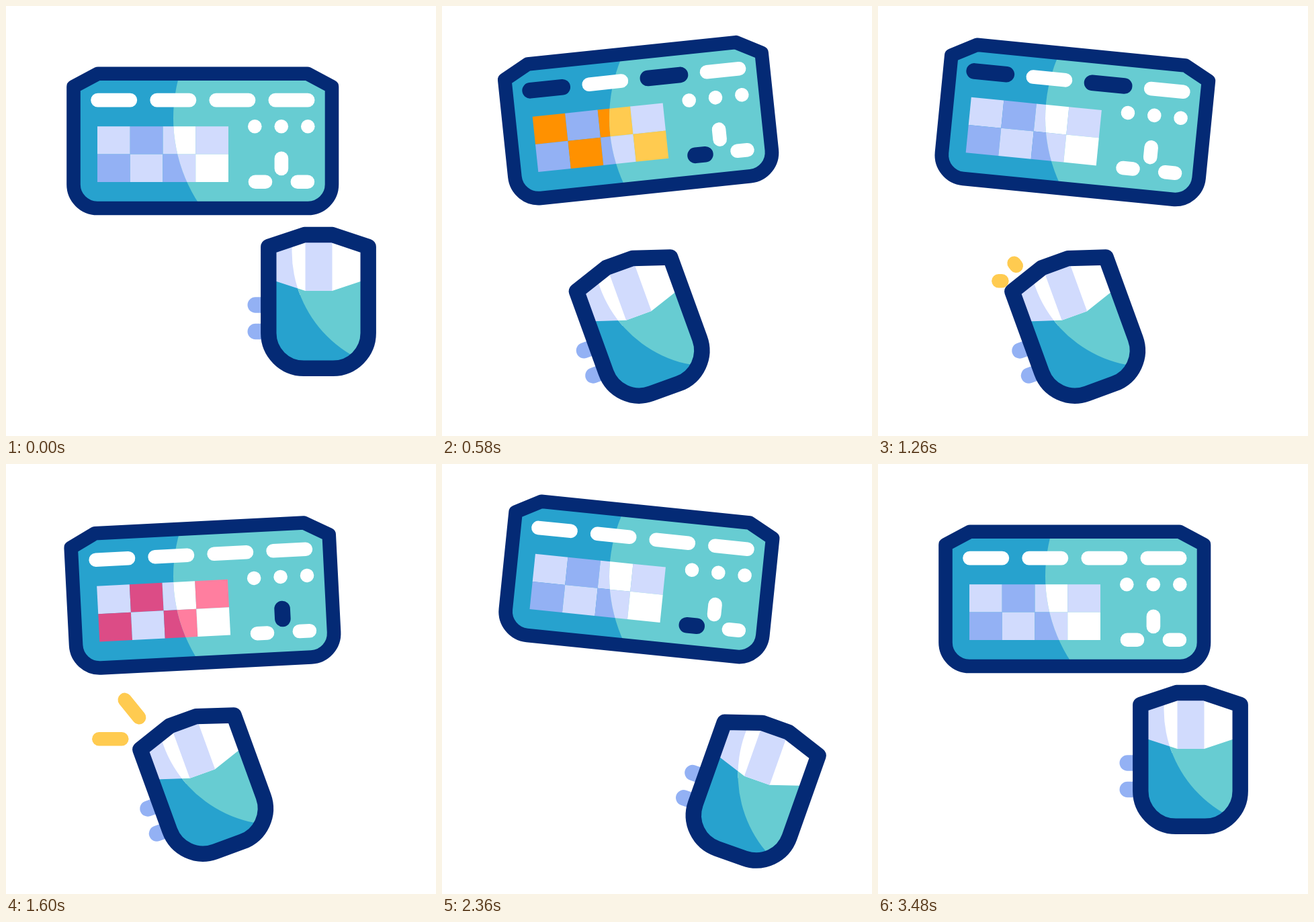
An HTML page with a canvas for the animation above (3600 ms loop, 640 by 640 pixels).

```html
<!DOCTYPE html>
<html lang="en">
<head>
<meta charset="utf-8">
<title>Keyboard and mouse</title>
<style>
  html, body { margin: 0; width: 100%; height: 100%; overflow: hidden; background: #fff; }
  canvas { display: block; width: 640px; height: 640px; }
</style>
</head>
<body>
<canvas id="stage" width="640" height="640"></canvas>
<script>
const ctx = document.getElementById('stage').getContext('2d');
const LOOP = 3600, END = 3480, BEAT = 600, HOP = 900;
const NAVY = '#042a75', WHITE = '#fff', LAVENDER = '#d1dbfd', PERIWINKLE = '#93b1f4';
const BLUE = '#27a2ce', TEAL = '#67ccd2', YELLOW = '#ffcb50';

// Each theme: board colour, then idle and lit colours of the two checker groups.
const DARK = { base: BLUE, idle: [LAVENDER, PERIWINKLE], lit: ['#ff9100', '#dc4c86'] };
const LIGHT = { base: TEAL, idle: [WHITE, LAVENDER], lit: [YELLOW, '#ff7e9f'] };

// Presses last one beat and straddle the beat they are named after.
const pressBeat = t => Math.floor(t / BEAT + 0.5);
const checkerLit = (group, beat) => beat === 5 || beat === (group ? 3 : 1);
const functionLit = beat => beat === 1 || beat === 2;
const leftLit = beat => beat === 1 || beat >= 4 && beat < 6;
const upLit = beat => beat === 3 || beat === 5;
const rightLit = beat => beat === 5;

const smooth = u => u * u * (3 - 2 * u);
const clamp = u => Math.min(1, Math.max(0, u));

// Counts steps of equal length; the last one is shortened to finish at END.
function stepAt(t, length) {
  const last = Math.ceil(END / length) - 1;
  const start = last * length;
  return t < start ? t / length : last + clamp((t - start) / (END - start));
}

// Eases between the poses of neighbouring steps.
function glide(pose, step) {
  const n = Math.floor(step);
  return pose(n) + (pose(n + 1) - pose(n)) * smooth(step - n);
}

const swing = n => n % 6 ? (n % 2 ? -1 : 1) : 0;
const mouseSide = n => n % 6 ? (n < 4 ? -1 : 1) : 0;
const mouseLeft = n => mouseSide(n) < 0 ? 1 : 0;
const mouseDrop = n => mouseSide(n) ? 41.2 + 5 * mouseSide(n) : 0;

function posed(x, y, degrees, originX, originY, draw) {
  ctx.save();
  ctx.translate(x, y);
  ctx.rotate(degrees * Math.PI / 180);
  ctx.translate(-originX, -originY);
  draw();
  ctx.restore();
}

function circle(x, y, r) {
  ctx.beginPath();
  ctx.arc(x, y, r, 0, Math.PI * 2);
}

function capsule(x, y, w, h, color) {
  ctx.beginPath();
  ctx.roundRect(x, y, w, h, Math.min(w, h) / 2);
  ctx.fillStyle = color;
  ctx.fill();
}

function key(x, y, w, h, pressed) {
  const grow = pressed ? 1.5 : 0;
  capsule(x - grow, y - grow, w + 2 * grow, h + 2 * grow, pressed ? NAVY : WHITE);
}

// Case with chamfered top corners and rounded bottom corners
function shell(left, right, top, bottom, bevelX, bevelY, radius) {
  const p = new Path2D();
  p.moveTo(left, top + bevelY);
  p.lineTo(left + bevelX, top);
  p.lineTo(right - bevelX, top);
  p.lineTo(right, top + bevelY);
  p.arcTo(right, bottom, right - radius, bottom, radius);
  p.arcTo(left, bottom, left, bottom - radius, radius);
  p.closePath();
  return p;
}

const boardShell = shell(100.5, 485, 100.7, 301, 36.5, 19.5, 35.5);
const mouseShell = shell(391.3, 539.7, 340.5, 539.3, 53.5, 17.8, 52.5);

function outline(path, width) {
  ctx.strokeStyle = NAVY;
  ctx.lineWidth = width;
  ctx.lineJoin = 'round';
  ctx.stroke(path);
}

function boardSurface(theme, beat) {
  ctx.fillStyle = theme.base;
  ctx.fill(boardShell);
  const w = 48.75, h = 41.4;
  for (let row = 0; row < 2; row++) {
    for (let col = 0; col < 4; col++) {
      const group = (row + col) % 2;
      ctx.fillStyle = (checkerLit(group, beat) ? theme.lit : theme.idle)[group];
      ctx.fillRect(136 + col * w, 179.2 + row * h, w, h);
    }
  }
}

function boardKeys(beat) {
  const thick = 20.6, arrow = 35.6;
  for (let i = 0; i < 4; i++) {
    key(126.2 + i * 88.1, 129.8, 69, thick, i % 2 === 0 && functionLit(beat));
  }
  for (let i = 0; i < 3; i++) key(360 + i * 39.5, 169, thick, thick, false);
  key(399.6, 216.6, thick, arrow, upLit(beat));
  key(360.7, 251.4, arrow, thick, leftLit(beat));
  key(423.6, 251.4, arrow, thick, rightLit(beat));
}

function drawBoard(t) {
  const beat = pressBeat(t);
  const lift = 43.4 * glide(n => n % 2, stepAt(t, HOP));
  const tilt = 6 * glide(swing, stepAt(t, BEAT));
  const pose = draw => posed(293, 200 - lift, tilt, 293, 200, draw);

  pose(() => boardSurface(DARK, beat));
  // The highlight edge stays still while the board sways beneath it.
  ctx.save();
  circle(480.6, 167, 231.6);
  ctx.clip();
  pose(() => boardSurface(LIGHT, beat));
  ctx.restore();
  pose(() => {
    outline(boardShell, 20.6);
    boardKeys(beat);
  });
}

// A line that grows outward, then vanishes from its inner end
function spark(x, y, degrees, grown, erased) {
  if (grown - erased < 0.001) return;
  const length = 46;
  posed(x, y, degrees, 0, 0, () => {
    ctx.beginPath();
    ctx.moveTo(length * erased, 0);
    ctx.lineTo(length * grown, 0);
    ctx.strokeStyle = YELLOW;
    ctx.lineWidth = 20.6;
    ctx.lineCap = 'round';
    ctx.stroke();
  });
}

// Sparks over the right button; mirrored for the left one
function clickSparks(side, t, start) {
  const grown = smooth(clamp((t - start) / 300));
  const erased = smooth(clamp((t - start - 300) / 300));
  ctx.save();
  ctx.scale(side, 1);
  spark(83.3, -101.6, -20, grown, erased);
  spark(55.5, -115.5, -71, grown, erased);
  ctx.restore();
}

// Buttons above and body below a seam that dips in the middle
function mouseSurface(body, buttons) {
  ctx.fillStyle = buttons;
  ctx.fillRect(380, 330, 172, 100);
  ctx.beginPath();
  ctx.moveTo(391, 406);
  ctx.lineTo(446, 424);
  ctx.lineTo(486, 424);
  ctx.lineTo(540, 406);
  ctx.lineTo(540, 545);
  ctx.lineTo(391, 545);
  ctx.fillStyle = body;
  ctx.fill();
}

function drawMouse(t) {
  const step = stepAt(t, BEAT);
  const x = 465 - 167.6 * glide(mouseLeft, step);
  const y = 440 + glide(mouseDrop, step);
  posed(x, y, 20 * glide(mouseSide, step), 465.5, 440, () => {
    for (let i = 0; i < 2; i++) capsule(360, 433.3 + i * 39.5, 50, 23.4, PERIWINKLE);

    ctx.save();
    ctx.clip(mouseShell);
    mouseSurface(BLUE, LAVENDER);
    ctx.save();
    circle(605, 365, 179);
    ctx.clip();
    mouseSurface(TEAL, WHITE);
    ctx.restore();
    ctx.fillStyle = LAVENDER;
    ctx.fillRect(446, 340, 40, 84);
    ctx.restore();

    outline(mouseShell, 23.4);
    ctx.translate(465.5, 440);
    clickSparks(-1, t, 2 * BEAT);
    clickSparks(1, t, 4 * BEAT);
  });
}

const began = performance.now();

function render(now) {
  const t = Math.max(0, now - began) % LOOP;
  ctx.fillStyle = WHITE;
  ctx.fillRect(0, 0, 640, 640);
  drawBoard(t);
  drawMouse(t);
  requestAnimationFrame(render);
}

render(began);
</script>
</body>
</html>
```
